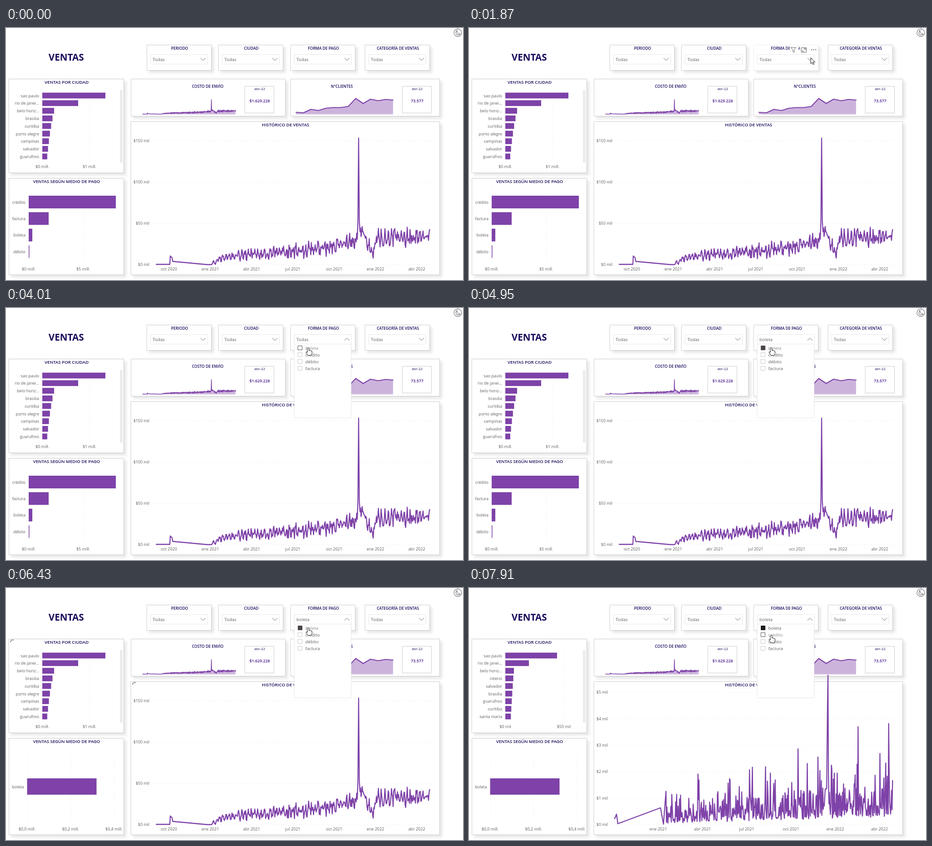
Recreate the animation shown at these times as an HTML page with a canvas. Size 1007 by 556 pixels, loop 8000 ms.

```html
<!DOCTYPE html>
<html lang="es">
<head>
<meta charset="utf-8">
<title>Ventas</title>
<style>
html, body { margin: 0; width: 100%; height: 100%; overflow: hidden; background: #fff }
canvas { display: block }
</style>
</head>
<body>
<canvas id="stage" width="1007" height="556"></canvas>
<script>
const c = document.getElementById('stage').getContext('2d');
const LOOP = 8000, PURPLE = '#7e42a8', AREA = '#ccb3dc', NAVY = '#1b0a5c', GREY = '#605e5c', ICON = '#666';
// Moments in ms at which the dashboard reacts.
const ENTER = 1120, OPEN = 2400, ITEMS = 3050, PICK = 4950, BUSY = 5150;
const READY = { trend: 6000, payments: 6100, sales: 6500, cities: 6700 };

const lerp = (a, b, u) => a + (b - a) * u;
const clamp = u => Math.max(0, Math.min(1, u));
const ease = u => u * u * (3 - 2 * u);
const range = (n, f) => Array.from({ length: n }, (_, i) => f(i));
const move = (t, t0, t1, a, b) => {
  const u = ease(clamp((t - t0) / (t1 - t0)));
  return [lerp(a[0], b[0], u), lerp(a[1], b[1], u)];
};

// Text is centred vertically on y by its capital height.
function text(s, x, y, size = 9, align = 'center', color = GREY, weight = 400) {
  c.font = `${weight} ${size}px "Open Sans", "Noto Sans", sans-serif`;
  c.textAlign = align;
  c.fillStyle = color;
  c.fillText(s, x, y + size * .357);
}
const heading = (s, x, y, size = 8.5) => text(s, x, y, size, 'center', NAVY, 600);

function fill(x, y, w, h, color = PURPLE) {
  c.fillStyle = color;
  c.fillRect(x, y, w, h);
}
function frame(x, y, w, h, color = '#cdcdcd') {
  c.strokeStyle = color;
  c.lineWidth = 1;
  c.strokeRect(x + .5, y + .5, w - 1, h - 1);
}
function card(x, y, w, h, border) {
  c.save();
  c.shadowColor = 'rgba(0,0,0,.1)';
  c.shadowBlur = 6;
  c.shadowOffsetX = c.shadowOffsetY = 5;
  fill(x, y, w, h, '#fff');
  c.restore();
  frame(x, y, w, h, border);
}
function trace(points) {
  c.beginPath();
  points.forEach(p => c.lineTo(...p));
}
function line(points, color = PURPLE, width = 2.3) {
  trace(points);
  c.strokeStyle = color;
  c.lineWidth = width;
  c.lineJoin = c.lineCap = 'round';
  c.stroke();
}
function area(points, base, width) {
  trace([...points, [points[points.length - 1][0], base], [points[0][0], base]]);
  c.fillStyle = AREA;
  c.fill();
  line(points, PURPLE, width);
}
function dotted(...ends) {
  const [x, y, x2, y2] = ends.map(v => Math.round(v) + .5);
  c.setLineDash([1, 4]);
  c.lineCap = 'butt';
  c.strokeStyle = '#dadada';
  c.lineWidth = 1;
  c.beginPath();
  c.moveTo(x, y);
  c.lineTo(x2, y2);
  c.stroke();
  c.setLineDash([]);
}

// Daily series, one sample per step between the first and last key point.
function daily(keys, step, seed, sample) {
  const rand = () => (seed = seed * 16807 % 2147483647) / 2147483647;
  const points = [];
  keys.slice(1).forEach(([x2, y2], i) => {
    const [x1, y1] = keys[i];
    for (let x = x1; x < x2; x += step)
      points.push([x, sample(x, lerp(y1, y2, (x - x1) / (x2 - x1)), rand)]);
  });
  return points;
}
const weekly = (x, y, rand) => {
  const size = lerp(4, 19, clamp((x - 453) / 370) ** .5);
  return Math.min(522, y - size * (.55 * Math.sin(x * 2 * Math.PI / 7) + 1.5 * (rand() - .5)));
};
const allSales = [
  [331, 521.5], [361, 521.5], [362, 503], [366, 507], [367.5, 515], [443, 522],
  ...daily([[453, 521], [480, 506], [560, 498], [690, 487], [775, 468]], 1.2, 4711, weekly),
  [775.5, 425], [777, 243], [778.5, 425],
  ...daily([[780, 440], [808, 495], [817, 462], [934, 462]], 1.2, 97, weekly)
];
// Small orders: exponentially distributed, so most days are low and a few are high.
const boletaSales = [
  [321, 509], [325, 499], [328, 520], [422, 485], [428.5, 521],
  ...daily([[434, 519], [789, 509]], 1.07, 2029, (x, y, rand) => y + Math.log(rand()) * lerp(17, 40, (x - 434) / 355)),
  [790, 256],
  ...daily([[791, 509], [934, 505]], 1.07, 31, (x, y, rand) => y + Math.log(rand()) * 38)
];
const shipping = allSales.map(([x, y]) => [301 + (x - 331) * .34, 190 + (y - 522) * .1147]);
const clients = [186, 187, 179.5, 182, 177, 175.5, 175.5, 173, 155.5, 166.5, 157, 160.5, 157.5, 159]
  .map((y, i) => [639 + i * 16.45, y]);

// Axis labels at the start of every quarter.
const quarters = (n, first, x, gap) => range(n, i => {
  const q = first + i;
  return [`${['ene', 'abr', 'jul', 'oct'][q % 4]} ${2020 + Math.floor(q / 4)}`, x + i * gap];
});
const amounts = (n, unit, gap) => range(n, i => [`$${i * unit} mil`, 522 - i * gap]);
const sales = {
  all: { right: 316, points: allSales, y: amounts(4, 50, 91.2), x: quarters(7, 3, 359, 91) },
  boleta: { right: 306, points: boletaSales, y: amounts(6, 1, 58.4), x: quarters(6, 4, 417, 97.5) }
};
// Two leading cities, then a tail that shrinks by a constant ratio.
const cities = {
  all: { axis: ['$0 mill.', '$1 mill.'], gap: 104, lead: [139, 79], tail: 26, ratio: .865,
    names: 'sao paulo,rio de janei...,belo horiz...,brasilia,curitiba,porto alegre,campinas,salvador,guarulhos' },
  boleta: { axis: ['$0 mil', '$50 mil'], gap: 129, lead: [114, 52], tail: 19, ratio: .93,
    names: 'sao paulo,rio de janei...,belo horiz...,niteroi,salvador,brasilia,guarulhos,curitiba,santa maria' }
};
const payments = {
  all: { left: 50, top: 370, h: 28, axis: ['$0 mill.', '$5 mill.'], gap: 120,
    rows: [['crédito', 192], ['factura', 44], ['boleta', 8], ['débito', 1.5]] },
  boleta: { left: 46.5, top: 420, h: 36, axis: ['$0,0 mill.', '$0,2 mill.', '$0,4 mill.'], gap: 95.7,
    rows: [['boleta', 153]] }
};

function valueAxis(labels, left, gap, top, bottom, labelY) {
  labels.forEach((s, i) => {
    const x = left + i * gap;
    dotted(x, top, x, bottom);
    text(s, x, labelY);
  });
}
function bar(name, left, y, w, h) {
  fill(left, y, w, h);
  text(name, left - 7, y + h / 2 + .4, 9, 'right');
}
function spinner(x, y, t, end) {
  if (t < BUSY || t >= end) return;
  const head = (225 + (t - 5690) * .574) * Math.PI / 180;
  range(5, k => {
    const a = head - k * .46;
    fill(x + 7.8 + 4.6 * Math.cos(a), y + 6.3 + 4.6 * Math.sin(a), 1.5, 1.5, '#444');
  });
}
function drawCities({ axis, gap, lead, tail, ratio, names }, t) {
  card(6, 112, 254, 208);
  heading('VENTAS POR CIUDAD', 133.5, 120, 9.7);
  valueAxis(axis, 80, gap, 138, 296, 306);
  names.split(',').forEach((s, i) => bar(s, 80, 142.6 + i * 16.8, lead[i] || tail * ratio ** (i - 2), 12.8));
  fill(251, 137, 6, 160, '#ececec');
  spinner(6, 112, t, READY.cities);
}
function drawPayments({ left, top, h, axis, gap, rows }, t) {
  card(6, 331, 254, 214);
  heading('VENTAS SEGÚN MEDIO DE PAGO', 133.5, 339, 9.6);
  valueAxis(axis, left, gap, 355, 518, 531.5);
  rows.forEach(([s, w], i) => bar(s, left, top + i * 36.4, w, h));
  spinner(6, 331, t, READY.payments);
}
function drawSales({ right, points, x, y }, t) {
  card(275, 206, 681, 339);
  heading('HISTÓRICO DE VENTAS', 616, 213.5, 9.7);
  y.forEach(([s, v]) => {
    dotted(right + 5, v, 942, v);
    text(s, right, v, 8.9, 'right');
  });
  x.forEach(([s, v]) => text(s, v, 531.5));
  line(points);
  spinner(275, 206, t, READY.sales);
}
function drawTrend(x, w, title, tx, points, width, boxX, value, t) {
  card(x, 112, w, 83);
  heading(title, tx, 128.5);
  area(points, 190.5, width);
  frame(boxX, 128, 65, 60);
  text('abr-22', boxX + 33, 134, 7.8, 'center', NAVY);
  text(value, boxX + 33, 161, 8.8, 'center', '#43148a', 600);
  spinner(x + 16, 143, t, READY.trend);
  spinner(boxX, 128, t, READY.trend);
}
function drawSlicer(x, title, value = 'Todas', hover, open) {
  card(x, 37, 143, 57, hover ? '#ededed' : undefined);
  heading(title, x + 72.5, 44.5);
  frame(x + 8, 58, 127, 22, '#e6e6e6');
  text(value, x + 13, 70, 9.8, 'left');
  const dy = open ? -2.7 : 2.7;
  line([[x + 119, 69 - dy], [x + 124.3, 69 + dy], [x + 129.6, 69 - dy]], ICON, 1);
}
function drawHoverIcons() {
  fill(706.5, 40, 19, 15, '#fff');
  fill(729, 40, 40, 15, '#fff');
  c.strokeStyle = ICON;
  c.lineWidth = 1;
  c.stroke(new Path2D('M709 43H721L716.5 48V54L713.5 52V48Z'));
  c.stroke(new Path2D('M732.5 43.5H743.5V53.5H732.5ZM738 48L741.5 45M738.5 45H741.5V48M734.5 49V51.5H737.5'));
  range(3, i => fill(754 + i * 4.5, 47, 2, 2, ICON));
}
function drawList(filled, hovered, checked) {
  fill(635, 79, 126, 164, '#fff');
  frame(635, 79, 126, 164, '#e6e6e6');
  if (!filled) return;
  ['boleta', 'crédito', 'débito', 'factura'].forEach((s, i) => {
    const y = 89 + i * 15, over = hovered === i;
    if (checked && i === 0) fill(643, 83, 10, 10, over ? '#4b454a' : '#1d1b1c');
    else frame(643, y - 6, 10, 10, over ? '#555' : '#cacaca');
    text(s, 659.5, y, 9.8, 'left', over ? '#8f8d8b' : GREY);
  });
}
function drawMoon() {
  c.strokeStyle = '#6b6470';
  c.lineWidth = 1.1;
  c.beginPath();
  c.arc(995.5, 10.5, 8.4, 0, 7);
  c.stroke();
  c.stroke(new Path2D('M994 5.5A5.3 5.3 0 1 0 1001 13A6 6 0 0 1 994 5.5Z'));
}
const ARROW = new Path2D('M0 0V12.5L3 9.8 5 14.5 7.2 13.5 5.2 9H9Z');
const HAND = new Path2D('M-2 1Q0-1 1.7 1V6.3L4 6 6 7 8.3 8V13L6.5 17H-.5L-5 10.5Q-4.8 8-2 10Z');
function drawCursor(shape, [x, y]) {
  c.save();
  c.translate(x, y);
  c.fillStyle = '#fff';
  c.strokeStyle = '#111';
  c.lineWidth = 1;
  c.fill(shape);
  c.stroke(shape);
  c.restore();
}
function pointer(t) {
  if (t < 2120) return move(t, 1050, 1800, [745, 0], [753, 66]);
  if (t < 3270) return move(t, 2120, 2920, [753, 66], [737, 69.5]);
  if (t < 7440) return move(t, 3270, 3870, [737, 69.5], [666, 87.5]);
  return move(t, 7440, 7910, [666, 87.5], [666, 104]);
}

function draw(t) {
  const at = pointer(t), shown = t >= ENTER, open = t >= OPEN, picked = t >= PICK;
  const inHeader = shown && at[1] > 37 && at[1] < 79;
  const overList = at[1] > 82 && at[0] < 695;
  const view = (set, ready) => t >= ready ? set.boleta : set.all;

  fill(0, 0, 1007, 556, '#fff');
  text('VENTAS', 132.7, 64.5, 20.6, 'center', NAVY, 700);
  drawMoon();
  drawSlicer(310, 'PERIODO');
  drawSlicer(468, 'CIUDAD');
  drawSlicer(627, 'FORMA DE PAGO', picked ? 'boleta' : 'Todas', inHeader, open);
  drawSlicer(791, 'CATEGORÍA DE VENTAS');

  drawCities(view(cities, READY.cities), t);
  drawPayments(view(payments, READY.payments), t);
  drawTrend(275, 341, 'COSTO DE ENVÍO', 444.5, shipping, 1.5, 526, '$1.629.228', t);
  drawTrend(627, 329, 'N°CLIENTES', 740, clients, 2.2, 873, '73.577', t);
  drawSales(view(sales, READY.sales), t);

  if (open) drawList(t >= ITEMS, overList ? Math.floor((at[1] - 81) / 15) : -1, picked);
  if (inHeader) drawHoverIcons();
  if (shown) drawCursor(overList ? HAND : ARROW, at);
}

function tick(now) {
  draw(now % LOOP);
  requestAnimationFrame(tick);
}
requestAnimationFrame(tick);
</script>
</body>
</html>
```
